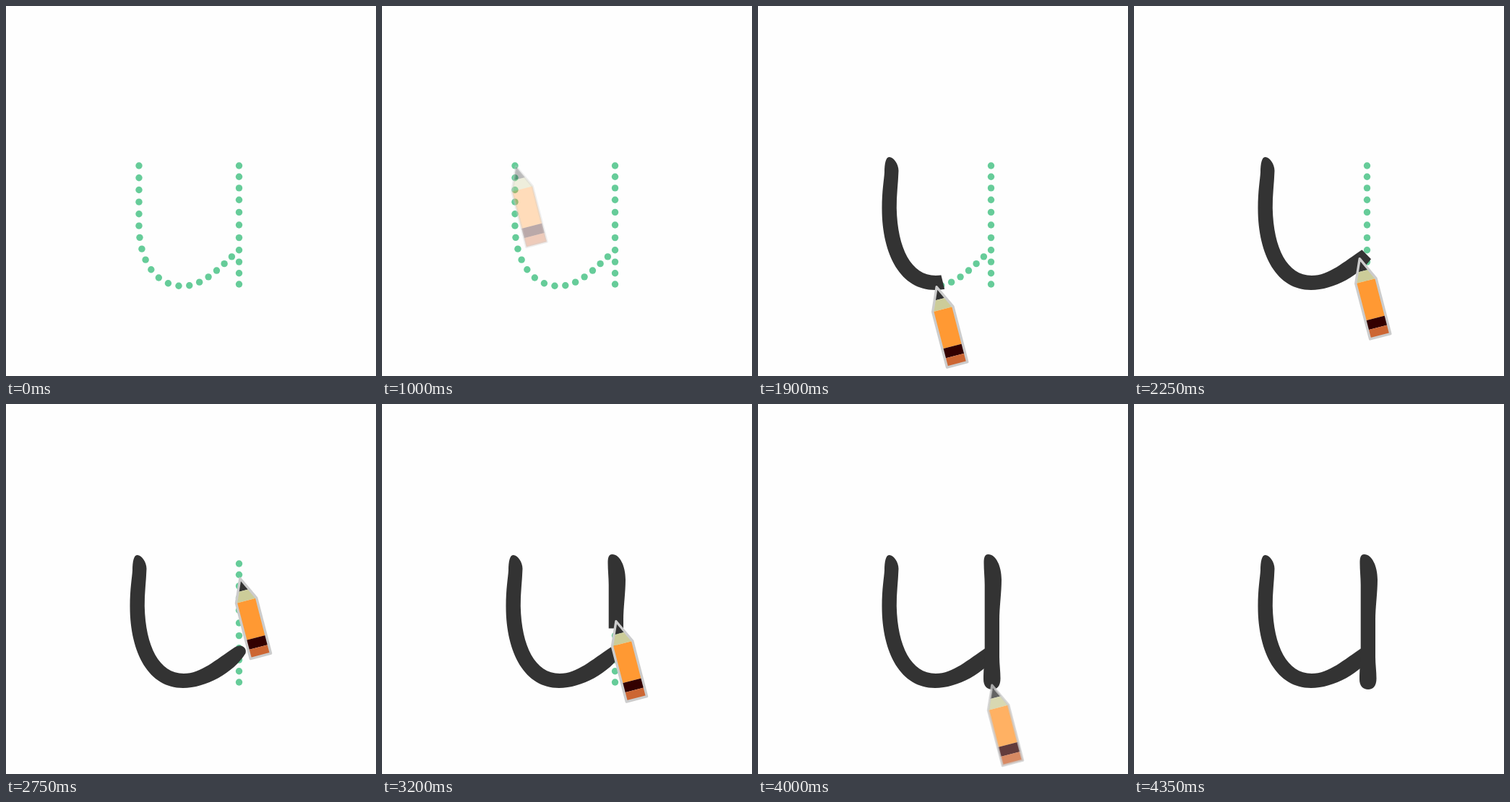
These frames come from a looping animation (512x512 px, 5500 ms). An HTML page with a canvas:

```html
<!DOCTYPE html>
<html lang="en">
<head>
<meta charset="utf-8">
<title>Writing the letter u</title>
<style>
  html, body { margin: 0; width: 100%; height: 100%; overflow: hidden; background: #fefefe; }
  canvas { display: block; width: 100vw; height: 100vh; }
</style>
</head>
<body>
<canvas id="stage" width="512" height="512"></canvas>
<script>
const ctx = document.getElementById("stage").getContext("2d");
const LOOP = 5500, STEP = 50;
const GREEN = "#66cc99", INK = "#333";

// A stroke has a track for the pencil tip, a longer one that reveals the ink, and the ink outline
function makeStroke(x, track, exit, outline) {
  const tip = document.createElementNS("http://www.w3.org/2000/svg", "path");
  tip.setAttribute("d", `M${x} 221${track}`);
  const length = tip.getTotalLength();
  return {
    length,
    at: distance => tip.getPointAtLength(distance),
    reveal: new Path2D(`M${x} 208${track}${exit}`),
    outline: new Path2D(outline),
  };
}

const bowl = makeStroke(184, "V304C184 345 202 387.5 245 387.5C270 387.5 290 369 322.5 337", "L336 325",
  `M181.5 209C188 209 194.5 219 194.5 228C194 245 191.5 262 191.8 280C193 335 212 373 246 373
   C270 373 290 354 316 337C324 331 334 336 331.5 345C315 372 276 393 245 393
   C198 393 171.5 345 171.5 280C171.5 255 174.5 240 175 230C175 218 177 209 181.5 209Z`);
const stem = makeStroke(322.5, "V388", "V402",
  `M318.5 208C329 208 337 224 337 243C337 262 334 280 334 300V350C334 360 335.5 370 335.5 380
   C335.5 390 331 395 324 395S312 390 312 381C312 365 313.7 355 313.7 340V250
   C313.7 240 312.5 230 312.5 220C312.5 212 314 208 318.5 208Z`);

// Hand-set look: even spacing with a gentle drift along the stroke
const bowlDots = Array.from({ length: 19 }, (_, i) =>
  bowl.at(bowl.length * i / 19 + 8 * Math.sin(Math.PI * i / 19)));
const stemDots = Array.from({ length: 11 }, (_, i) =>
  stem.at(16.4 * i - 2 * Math.sin(Math.PI * i / 5)));

function easeOut(t, start, end) {
  const p = Math.min(1, Math.max(0, (t - start) / (end - start)));
  return 1 - (1 - p) ** 2;
}

// Ink runs slightly ahead of the pencil tip
function drawInk(stroke, progress) {
  if (progress <= 0) return;
  const drawn = progress * stroke.length;
  ctx.save();
  ctx.clip(stroke.outline);
  ctx.strokeStyle = INK;
  ctx.lineWidth = 48;
  ctx.setLineDash([drawn + 24 * Math.min(1, drawn / 20), 2000]);
  ctx.stroke(stroke.reveal);
  ctx.restore();
}

function drawPencil({ x, y }, alpha) {
  ctx.save();
  ctx.globalAlpha = alpha;
  ctx.translate(x + 1.4, y + 1.3);
  ctx.rotate(-14.5 * Math.PI / 180);
  const body = new Path2D("M0 0L15.3 32V111.3H-13.9V32Z");
  ctx.save();
  ctx.clip(body);
  const bands = [[0, INK], [17.5, "#cccc99"], [32, "#ff9933"], [85, "#330000"], [98.5, "#cc6633"]];
  bands.forEach(([top, color], i) => {
    const bottom = i + 1 < bands.length ? bands[i + 1][0] : 112;
    ctx.fillStyle = color;
    ctx.fillRect(-16, top, 34, bottom - top);
  });
  ctx.restore();
  ctx.strokeStyle = "#ccc";
  ctx.lineWidth = 3.4;
  ctx.lineJoin = "round";
  ctx.stroke(body);
  ctx.restore();
}

function draw(t) {
  const bowlProgress = easeOut(t, 1440, 2500);
  const liftProgress = easeOut(t, 2500, 2920);
  const stemProgress = easeOut(t, 2920, 3950);

  ctx.fillStyle = "#fefefe";
  ctx.fillRect(0, 0, 512, 512);
  ctx.fillStyle = GREEN;
  for (const { x, y } of [...bowlDots, ...stemDots]) {
    ctx.beginPath();
    ctx.arc(x, y, 4.7, 0, 2 * Math.PI);
    ctx.fill();
  }

  drawInk(bowl, bowlProgress);
  drawInk(stem, stemProgress);

  const tip = stemProgress > 0 ? stem.at(stemProgress * stem.length)
    : liftProgress > 0 ? { x: 322.5, y: 337 - 116 * liftProgress }
    : bowl.at(bowlProgress * bowl.length);
  const alpha = t < 1000 ? 0 : easeOut(t, 900, 1440) * (1 - easeOut(t, 3950, 4350));
  drawPencil(tip, alpha);
}

const startTime = performance.now();
function tick() {
  const t = (performance.now() - startTime) % LOOP;
  draw(Math.floor(t / STEP) * STEP);
  requestAnimationFrame(tick);
}
tick();
</script>
</body>
</html>
```
